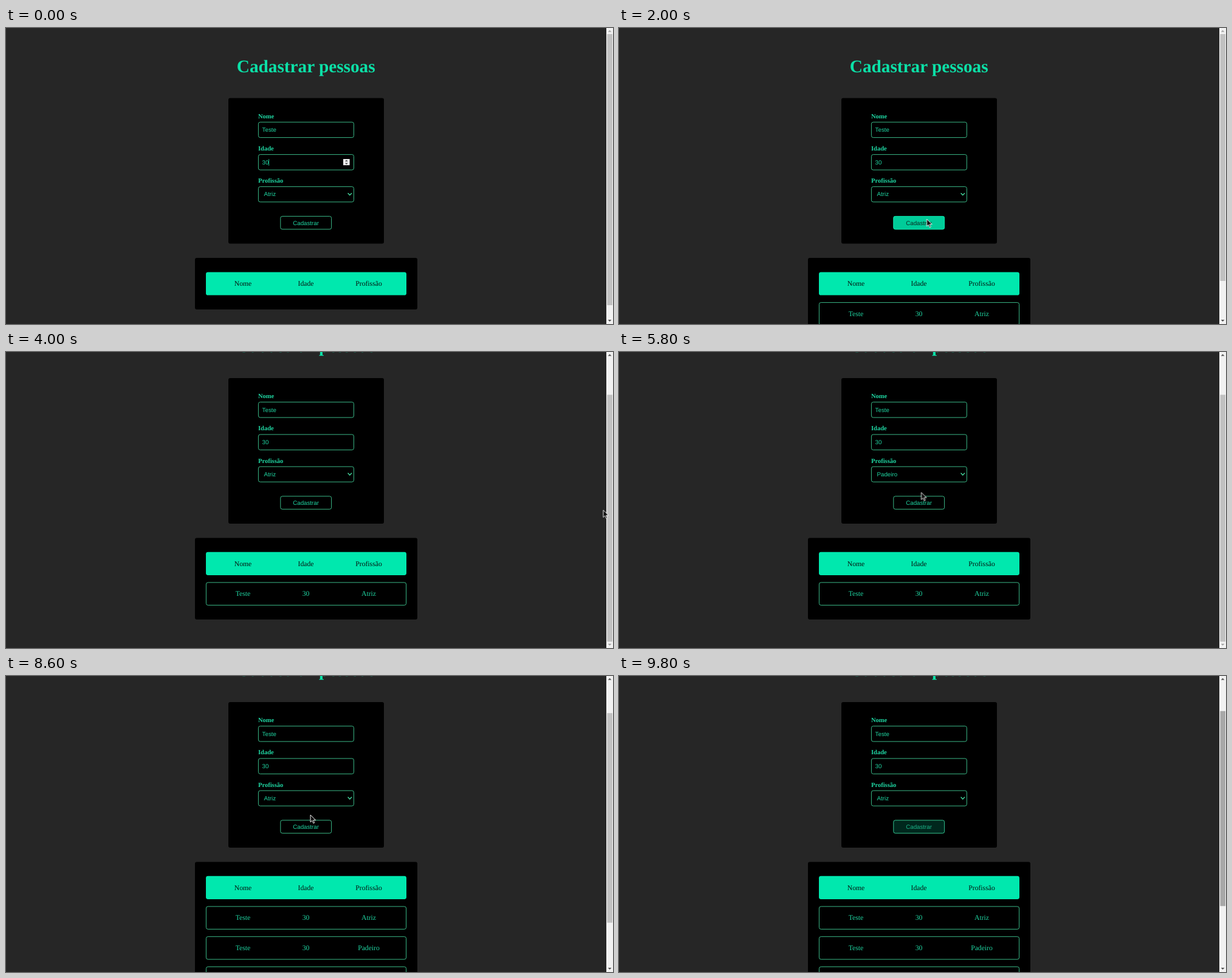
Recreate the animation shown at these times as an HTML page. Size 999 by 488 pixels, loop 9900 ms.

```html
<!DOCTYPE html>
<html lang="pt">
<head>
<meta charset="utf-8">
<title>Cadastrar pessoas</title>
<style>
@property --hover { syntax: "<number>"; inherits: true; initial-value: 0; }

:root { --accent: #00e8ae; --text: #1fd6a2; --line: #45d99f; --bg: #262626; }
html, body { margin: 0; width: 100%; height: 100%; overflow: hidden; background: var(--bg); }
svg { display: block; width: 100vw; height: 100vh; }

text { text-rendering: geometricPrecision; fill: var(--text); }
.serif { font-family: "Liberation Serif", Times, serif; }
.sans { font: 9.75px "Liberation Sans", Arial, sans-serif; }
h1, .title { font-size: 29.25px; font-weight: bold; fill: #0ce0a7; }
.label { font-size: 10.53px; font-weight: bold; }
.cell { font-size: 11.7px; text-anchor: middle; }
.head text { fill: #06130f; }
.mid { text-anchor: middle; }
.box { fill: #000; stroke: var(--line); stroke-width: .85; }

/* 1% = 99 ms */
.anim, .row { animation: 9.9s step-end infinite; }
#page { animation-name: scroll; animation-timing-function: linear; }
#panel { animation-name: panel; }
#row1 { animation-name: row1; }
#row2 { animation-name: row2; }
#row3 { animation-name: row3; }
#caret { animation-name: caret; }
#spin { animation-name: spin; }
#jobA { animation-name: jobA; }
#jobB { animation-name: jobB; }
#button { animation-name: hover; animation-timing-function: linear; }
#button .fill { fill: var(--accent); fill-opacity: var(--hover); }
#button text { fill: color-mix(in srgb, #06130f calc(var(--hover) * 100%), var(--text)); }
#thumb { y: 10px; height: 447px; fill: #c1c1c1; animation-name: thumbPos, thumbSize, thumbTone; }
#up { fill: #505050; animation-name: upTone; }
#down { fill: #505050; animation-name: downTone; }
#cursor { animation-name: show, move; animation-timing-function: step-end, linear; }

@keyframes scroll {
  0%, 29.8% { transform: translateY(0); }
  31.31% { transform: translateY(-21.3px); }
  35.4% { transform: translateY(-60px); }
  38.38%, 100% { transform: translateY(-72.6px); }
}
@keyframes thumbPos {
  0% { y: 10px; }
  29.8% { y: 10px; animation-timing-function: linear; }
  31.31% { y: 27.8px; animation-timing-function: linear; }
  35.4% { y: 60.1px; animation-timing-function: linear; }
  38.38% { y: 70.5px; }
  62.6% { y: 65.7px; }
  67.6% { y: 61.2px; }
  91.9%, 100% { y: 57.8px; }
}
@keyframes thumbSize {
  0% { height: 447px; }
  20.15% { height: 407px; }
  62.6% { height: 374px; }
  67.6% { height: 345.5px; }
  91.9%, 100% { height: 321.5px; }
}
@keyframes thumbTone {
  0% { fill: #c1c1c1; }
  28.3% { fill: #a8a8a8; }
  29.8% { fill: #7b7b7b; }
  40.4% { fill: #c1c1c1; }
  96.9%, 100% { fill: #a8a8a8; }
}
@keyframes upTone {
  0% { fill: #a3a3a3; }
  29.9%, 100% { fill: #505050; }
}
@keyframes downTone {
  0% { fill: #505050; }
  38.38% { fill: #a3a3a3; }
  62.6%, 100% { fill: #505050; }
}
@keyframes panel {
  0% { height: 85px; }
  20.15% { height: 134.5px; }
  62.6%, 100% { height: 300px; }
}
@keyframes row1 { 0% { visibility: hidden; } 20.15%, 100% { visibility: visible; } }
@keyframes row2 { 0% { visibility: hidden; } 62.6%, 100% { visibility: visible; } }
@keyframes row3 { 0% { visibility: hidden; } 67.6%, 100% { visibility: visible; } }
@keyframes caret {
  0%, 8.08%, 18.18% { visibility: visible; }
  3.03%, 13.13%, 20.15%, 100% { visibility: hidden; }
}
@keyframes spin { 0% { visibility: visible; } 20.15%, 100% { visibility: hidden; } }
@keyframes jobA {
  0%, 83.8%, 100% { visibility: visible; }
  53.5% { visibility: hidden; }
}
@keyframes jobB {
  0%, 83.8%, 100% { visibility: hidden; }
  53.5% { visibility: visible; }
}
@keyframes hover {
  0%, 17.3% { --hover: 0; }
  20.2% { --hover: .88; }
  21.2%, 22.2% { --hover: 1; }
  24.4% { --hover: .25; }
  27%, 59.4% { --hover: 0; }
  62% { --hover: .83; }
  64.4%, 73.4% { --hover: 1; }
  76% { --hover: .17; }
  78.4%, 87.4% { --hover: 0; }
  90.2% { --hover: .83; }
  92.4%, 96.2% { --hover: 1; }
  98.99% { --hover: .17; }
  100% { --hover: .12; }
}
@keyframes show {
  0% { visibility: hidden; }
  10.1% { visibility: visible; }
  44.4% { visibility: hidden; }
  53.5% { visibility: visible; }
  80.8% { visibility: hidden; }
  83.8% { visibility: visible; }
  97.3%, 100% { visibility: hidden; }
}
@keyframes move {
  0%, 10.1% { transform: translate(518px, 238px); }
  15.2% { transform: translate(512px, 285px); }
  17.3% { transform: translate(509px, 311px); }
  20.2%, 21.6% { transform: translate(506.5px, 315px); }
  25% { transform: translate(720px, 270px); }
  28.3% { transform: translate(983px, 203px); }
  29.8% { transform: translate(984px, 201px); }
  31.31% { transform: translate(983.5px, 218.5px); }
  35.4% { transform: translate(985px, 250px); }
  38.38%, 40.4% { transform: translate(986px, 261px); }
  42.4% { transform: translate(545px, 205px); }
  44.4% { transform: translate(530px, 203px); animation-timing-function: step-end; }
  53.5%, 58.6% { transform: translate(497.5px, 231.5px); }
  60.2% { transform: translate(499px, 240px); }
  63%, 72.8% { transform: translate(500.5px, 243.5px); }
  75% { transform: translate(505px, 222px); }
  79% { transform: translate(515px, 202px); animation-timing-function: step-end; }
  83.8%, 86.9% { transform: translate(501px, 229px); }
  88.6%, 94.9% { transform: translate(502px, 243px); }
  96.2% { transform: translate(537px, 250px); }
  97.2%, 100% { transform: translate(1004px, 290px); }
}
</style>
</head>
<body>
<svg viewBox="0 0 999 488">
  <rect width="999" height="488" fill="#262626"/>

  <g id="page" class="anim">
    <text class="serif title mid" x="493.7" y="73">Cadastrar pessoas</text>

    <rect x="366" y="115.5" width="256" height="240" rx="3"/>
    <g class="serif label">
      <text x="415" y="148.7">Nome</text>
      <text x="415" y="202">Idade</text>
      <text x="415" y="255.4">Profissão</text>
    </g>
    <rect class="box" x="415.4" y="155.2" width="157" height="25.4" rx="3"/>
    <rect class="box" x="415.4" y="208.6" width="157" height="25.4" rx="3"/>
    <rect class="box" x="415.4" y="261.6" width="157" height="25.2" rx="3"/>
    <g class="sans">
      <text x="421.6" y="171.4">Teste</text>
      <text x="421.6" y="224.9">30</text>
      <text id="jobA" class="anim" x="424.5" y="277.4">Atriz</text>
      <text id="jobB" class="anim" x="424.5" y="277.4">Padeiro</text>
    </g>
    <rect id="caret" class="anim" x="432.3" y="216" width=".8" height="11" fill="#1fd6a2"/>
    <g id="spin" class="anim">
      <rect x="555" y="216" width="10.6" height="10.2" fill="#efefef"/>
      <path d="M557.8 220L560.3 217.4L562.8 220ZM557.8 222.4L560.3 225L562.8 222.4Z" fill="#505050"/>
    </g>
    <path d="M562.6 272.2L565.8 275.5L569 272.2" fill="none" stroke="#45d99f" stroke-width="1.4"/>

    <g id="button" class="anim">
      <rect class="box" x="451.8" y="310.4" width="83.8" height="21.4" rx="3"/>
      <rect class="fill" x="451.4" y="310" width="84.6" height="22.2" rx="3.4"/>
      <text class="sans mid" x="493.6" y="324.8">Cadastrar</text>
    </g>

    <rect id="panel" class="anim" x="311" y="379" width="366" height="85" rx="3"/>
    <g class="serif cell head">
      <rect x="329" y="402.4" width="330" height="38.2" rx="3.4" fill="#00e8ae"/>
      <text x="390" y="425.2">Nome</text>
      <text x="493.5" y="425.2">Idade</text>
      <text x="597" y="425.2">Profissão</text>
    </g>
    <g id="row1" class="row serif cell">
      <rect class="box" x="329.4" y="452.6" width="329.2" height="37.4" rx="3"/>
      <text x="390" y="475">Teste</text>
      <text x="493.5" y="475">30</text>
      <text x="597" y="475">Atriz</text>
    </g>
    <g id="row2" class="row serif cell">
      <rect class="box" x="329.4" y="502.3" width="329.2" height="37.4" rx="3"/>
      <text x="390" y="524.7">Teste</text>
      <text x="493.5" y="524.7">30</text>
      <text x="597" y="524.7">Padeiro</text>
    </g>
    <g id="row3" class="row serif cell">
      <rect class="box" x="329.4" y="552" width="329.2" height="37.4" rx="3"/>
      <text x="390" y="574.4">Teste</text>
      <text x="493.5" y="574.4">30</text>
      <text x="597" y="574.4">Padeiro</text>
    </g>
  </g>

  <rect x="988" width="11" height="488" fill="#f1f1f1"/>
  <rect id="thumb" class="anim" x="989.3" width="8.7"/>
  <path id="up" class="anim" d="M990.7 6.5L993.6 3.5L996.5 6.5Z"/>
  <path id="down" class="anim" d="M990.7 481L993.6 484L996.5 481Z"/>

  <path id="cursor" class="anim" d="M0 0V12L2.8 9.4L4.8 13.8L6.7 13L4.8 8.7H8.7Z" fill="#111" stroke="#fff" stroke-width=".9"/>
</svg>
</body>
</html>
```
